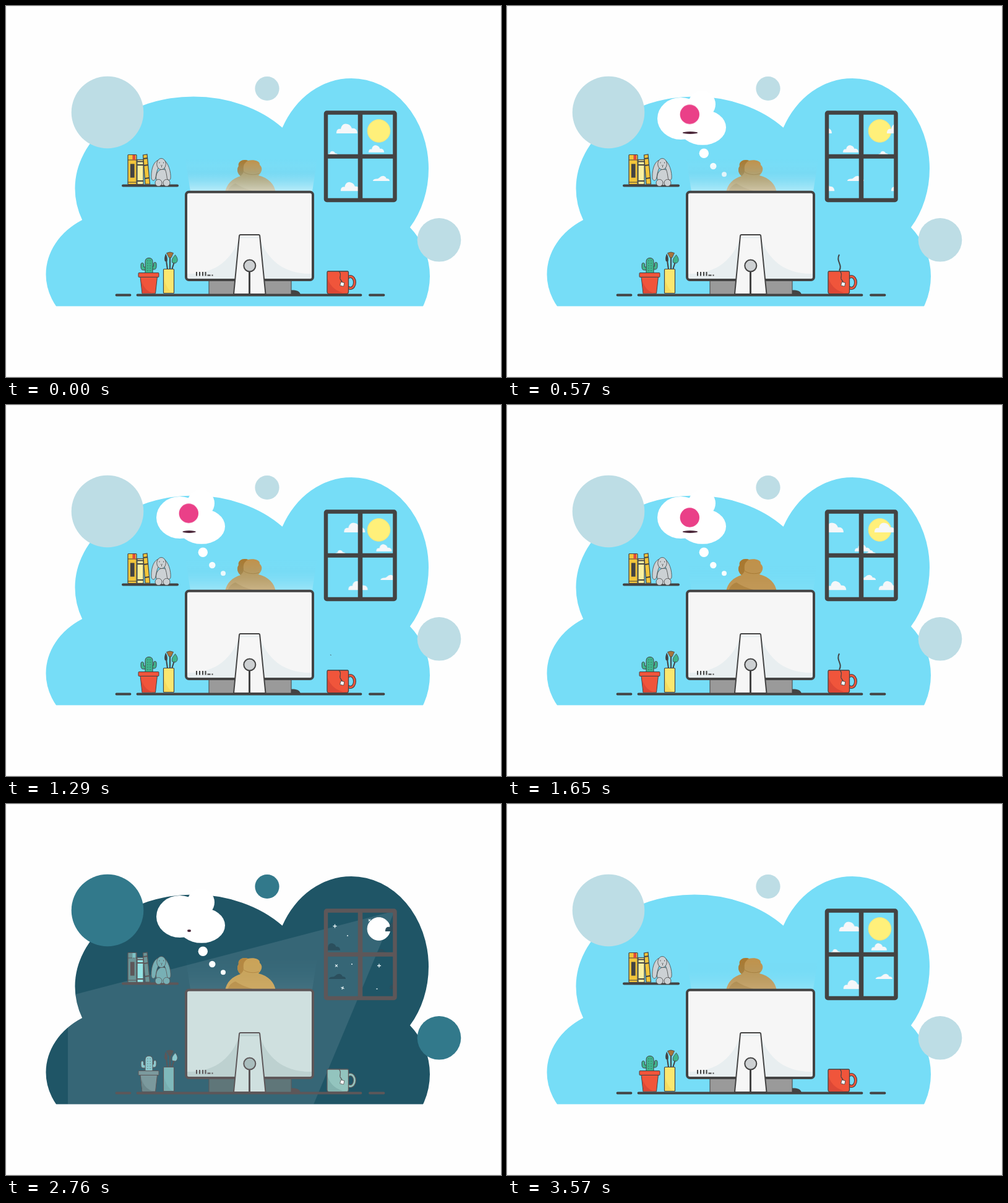
Write an HTML page that moves like this. It is 800 px wide and 600 px high and loops after 3600 ms.

```html
<!DOCTYPE html>
<html lang="en">
<head>
<meta charset="utf-8">
<title>Desk, day and night</title>
<style>
@property --n { syntax: '<percentage>'; inherits: true; initial-value: 0%; }
html, body { margin: 0; width: 100%; height: 100%; overflow: hidden; background: #fefefe; }
svg {
  display: block; width: 800px; height: 600px;
  animation: night 3600ms linear infinite;
  --sky: color-mix(in srgb, #1f5566 var(--n), #76ddf7);
  --orb: color-mix(in srgb, #32798b var(--n), #bddde5);
  --ink: color-mix(in srgb, #5d5759 var(--n), #434343);
  --mug: color-mix(in srgb, #93c4be var(--n), #f0553b);
  --mugDark: color-mix(in srgb, #82b2ae var(--n), #dd4836);
  --pot: color-mix(in srgb, #7b999d var(--n), #f0553b);
  --potDark: color-mix(in srgb, #6c878b var(--n), #dd4836);
  --pale: color-mix(in srgb, #cfe0df var(--n), #f6f6f6);
  --shade: color-mix(in srgb, #bdd1d0 var(--n), #e8eef0);
  --gray: color-mix(in srgb, #5f7679 var(--n), #9a9a9a);
  --knob: color-mix(in srgb, #a9bdbd var(--n), #cdd0d2);
  --green: color-mix(in srgb, #8cc9cf var(--n), #3fb58e);
  --gold: color-mix(in srgb, #6b9698 var(--n), #f2c53b);
  --butter: color-mix(in srgb, #7fb9bb var(--n), #fae76f);
  --cream: color-mix(in srgb, #94e3e4 var(--n), #f9f0a0);
  --mark: color-mix(in srgb, #7fc4c8 var(--n), #e0493a);
  --wood: color-mix(in srgb, #55595c var(--n), #a8743c);
  --fur: color-mix(in srgb, #78b0b5 var(--n), #ccd1d4);
  --hair: color-mix(in srgb, #cba358 var(--n), #c0914a);
  --hairDark: color-mix(in srgb, #b58740 var(--n), #a9782f);
  --sun: color-mix(in srgb, #ffffff var(--n), #fff07a);
  --rim: color-mix(in srgb, #ffffff var(--n), #e6e58c);
  --dusk: color-mix(in srgb, #2b4f5d var(--n), #f5f7f9);
}
@keyframes night { 0%, 47% { --n: 0%; } 55.5%, 90.8% { --n: 100%; } 98%, 100% { --n: 0%; } }
.late { opacity: var(--n); }
.ink { fill: none; stroke: var(--ink); }

.drift { fill: #f5f7f9; animation: 3600ms linear infinite; }
.dim { fill: var(--dusk); }
.a { animation-name: driftA; }
.b { animation-name: driftB; }
.c { animation-name: driftC; }
@keyframes driftA {
  0% { transform: translateX(534px); } 15.83% { transform: translateX(491px); }
  25% { transform: translateX(466px); } 33% { transform: translateX(420px); }
  33.01%, 55% { transform: translateX(690px); } 76.67% { transform: translateX(613px); }
  100% { transform: translateX(534px); }
}
@keyframes driftB {
  0% { transform: translateX(672px); } 15.83% { transform: translateX(614px); }
  25% { transform: translateX(586px); } 45.83% { transform: translateX(510px); }
  59.17% { transform: translateX(462px); } 75%, 100% { transform: translateX(400px); }
}
@keyframes driftC {
  0%, 25% { transform: translateX(690px); } 45.83% { transform: translateX(594px); }
  59.17% { transform: translateX(539px); } 76.67% { transform: translateX(463px); }
  100% { transform: translateX(400px); }
}

.pop, .ball, .shadow { transform-box: fill-box; transform-origin: center; }
.pop { fill: #fff; animation: pop 3600ms ease-out infinite backwards; }
@keyframes pop { 0%, 3% { transform: scale(0); } 6%, 81% { transform: scale(1); } 85%, 100% { transform: scale(0); } }

.bounce { animation: bounce 3600ms infinite; }
@keyframes bounce {
  0%, 12.5%, 25.83%, 39.17%, 52.5%, 65.83% {
    transform: translateY(0); animation-timing-function: cubic-bezier(.33, 0, .67, .33);
  }
  19.17%, 32.5%, 45.83%, 59.17%, 72.5%, 100% {
    transform: translateY(9px); animation-timing-function: cubic-bezier(.33, .67, .67, 1);
  }
}
.ball { fill: #ea4088; animation: ball 3600ms ease-out infinite; }
@keyframes ball { 0%, 12% { transform: scale(0); } 15%, 72.5% { transform: scale(1); } 75.5%, 100% { transform: scale(0); } }
.shadow { fill: #4a2638; animation: shadow 3600ms ease-in-out infinite; }
@keyframes shadow {
  0%, 12% { transform: scaleX(0); }
  15.83%, 19.17%, 32.5%, 45.83%, 59.17%, 72.5% { transform: scaleX(1); }
  25.83%, 39.17%, 52.5%, 65.83% { transform: scaleX(.75); }
  76.67% { transform: scaleX(.25); }
  77.8%, 100% { transform: scaleX(0); }
}

.steam { stroke-width: 2; stroke-dasharray: 1 2; animation: steam 3600ms linear infinite; }
.wisp { animation-name: wisp; }
@keyframes steam {
  0%, 7% { stroke-dashoffset: 1; } 15.83% { stroke-dashoffset: 0; } 23% { stroke-dashoffset: -1; }
  23.01%, 37% { stroke-dashoffset: 1; } 45.83% { stroke-dashoffset: 0; }
  53%, 100% { stroke-dashoffset: -1; }
}
@keyframes wisp {
  0%, 22% { stroke-dashoffset: 1; } 25% { stroke-dashoffset: .6; }
  29% { stroke-dashoffset: 0; } 36%, 100% { stroke-dashoffset: -1; }
}

.glow { animation: glow 3600ms linear infinite; }
@keyframes glow {
  0%, 25%, 100% { opacity: .85; } 15.83% { opacity: .7; } 45.83% { opacity: .1; }
  59.17% { opacity: .5; } 76.67% { opacity: .1; } 99% { opacity: .15; }
}
</style>
</head>
<body>
<svg viewBox="0 0 800 600">
  <defs>
    <clipPath id="floor"><rect width="800" height="485.5"/></clipPath>
    <clipPath id="room">
      <ellipse cx="303" cy="295" rx="191.5" ry="148.5"/>
      <ellipse cx="558" cy="263" rx="125" ry="146"/>
      <ellipse cx="190" cy="434" rx="125.5" ry="104"/>
      <ellipse cx="565" cy="437" rx="120" ry="116"/>
      <rect x="190" y="300" width="375" height="186"/>
    </clipPath>
    <clipPath id="panes">
      <rect x="520" y="175" width="49" height="65" rx="3"/>
      <rect x="576" y="175" width="49.500" height="65" rx="3"/>
      <rect x="520" y="246.500" width="49" height="64.500" rx="3"/>
      <rect x="576" y="246.500" width="49.500" height="64.500" rx="3"/>
    </clipPath>
    <linearGradient id="light" x1="0" y1="0" x2="0" y2="1">
      <stop offset="0" stop-color="#9fe4f7" stop-opacity="0"/>
      <stop offset=".4" stop-color="#7fd0ea" stop-opacity=".3"/>
      <stop offset="1" stop-color="#e4f7fc" stop-opacity=".75"/>
    </linearGradient>
    <path id="puff" d="M0 16C0 10 3 8 7 9C8 2 13-1 18 1C22 2 24 5 25 8C30 7 34 10 34 16Z"/>
    <path id="flat" d="M0 9Q0 6 5 5.500Q8 6 10 4Q14 0 18 1Q21 2 22 5Q27 5 27 9Z"/>
    <g id="sky">
      <use href="#puff" y="190"/>
      <use href="#puff" transform="translate(52 225) scale(.74)"/>
      <use href="#puff" transform="translate(-14 234.500) scale(.48)"/>
      <use href="#flat" x="59" y="274"/>
      <use href="#puff" transform="translate(7 284.500) scale(.92)"/>
    </g>
    <path id="plus" d="M-3 0H3M0-3V3"/>
  </defs>

  <rect x=".5" y=".5" width="799" height="599" fill="none" stroke="#f3f3f3"/>

  <g clip-path="url(#floor)">
    <rect width="800" height="600" fill="var(--sky)" clip-path="url(#room)"/>
    <path class="late" d="M628 173L100 311V486H497Z" fill="#fff" fill-opacity=".1" clip-path="url(#room)"/>
  </g>
  <g fill="var(--orb)">
    <circle cx="164" cy="172" r="58.300"/>
    <circle cx="422" cy="133.500" r="19.600"/>
    <circle cx="700" cy="378.300" r="35.300"/>
  </g>

  <!-- window -->
  <g clip-path="url(#panes)">
    <g class="late" fill="none" stroke="#e6f4f6" stroke-width="1.300">
      <use href="#plus" x="531.500" y="197.500"/>
      <use href="#plus" x="603" y="261.500"/>
      <use href="#plus" transform="translate(534 261.500) rotate(45) scale(.9)"/>
      <use href="#plus" transform="translate(544 297.500) rotate(25) scale(.9)"/>
      <use href="#plus" transform="translate(587.500 188) rotate(45) scale(.8)"/>
      <path d="M551 213h2M558 259h2M598.500 299h2"/>
    </g>
    <circle cx="602.500" cy="202" r="18.400" fill="var(--sun)" stroke="var(--rim)"/>
    <use href="#sky" class="drift dim a"/>
    <use href="#sky" class="drift b"/>
    <use href="#sky" class="drift dim c"/>
  </g>
  <g class="ink">
    <rect x="517" y="172.500" width="111.500" height="141.500" rx="1.500" stroke-width="6.500"/>
    <path d="M572.500 173V314" stroke-width="7.500"/>
    <path d="M517 243.300H628" stroke-width="7"/>
  </g>

  <!-- shelf -->
  <path class="ink" d="M189 290.500H277" stroke-width="4" stroke-linecap="round"/>
  <g stroke="var(--ink)" stroke-width="1.200">
    <rect x="197" y="240.500" width="14" height="48" rx="1" fill="var(--gold)"/>
    <path d="M197 249H211M197 285H211" fill="none"/>
    <rect x="201.500" y="256" width="5.500" height="21" fill="var(--ink)"/>
    <path d="M204.500 241h4.500v9l-2.200-2l-2.300 2z" fill="var(--mark)" stroke="none"/>
    <rect x="212" y="248.500" width="10" height="40" fill="var(--cream)"/>
    <path d="M212 251.500h10M212 257h10M212 283h10" stroke-width="2"/>
    <path d="M221.500 241L228 240L232.500 288H225Z" fill="var(--gold)"/>
    <path d="M222 247l6.500-1M223 258l6.500-1M224.500 279l6.500-1" stroke-width="2"/>
  </g>
  <g fill="var(--fur)" stroke="var(--ink)" stroke-width=".8">
    <ellipse cx="253" cy="277" rx="10.500" ry="13"/>
    <path d="M247 249C238 251 234 266 235 279C237 284 241 283 242 277C243 269 245 263 249 257Z"/>
    <path d="M255 249C262 253 267 268 266 279C264 284 260 281 260 276C259 268 257 262 253 257Z"/>
    <ellipse cx="251" cy="255.500" rx="7.300" ry="9"/>
    <circle cx="246.500" cy="286" r="5.500"/>
    <circle cx="259.500" cy="286" r="5.500"/>
    <path d="M250 257l1.500 1.500l1.500-1.500M251.500 259v2" fill="none"/>
    <path d="M247.500 253.500h1M254 253.500h1" stroke-width="1.600"/>
  </g>

  <!-- thought -->
  <circle class="pop" cx="351" cy="272.300" r="4"/>
  <circle class="pop" cx="333.300" cy="259" r="5.200" style="animation-delay:80ms"/>
  <circle class="pop" cx="318.300" cy="238.300" r="7.700" style="animation-delay:160ms"/>
  <g class="pop" style="animation-delay:240ms">
    <ellipse cx="281" cy="182" rx="38" ry="34"/>
    <ellipse cx="316" cy="196.300" rx="38" ry="28.500"/>
    <circle cx="315" cy="159" r="22"/>
  </g>
  <ellipse class="shadow" cx="296" cy="205" rx="12.300" ry="1.900"/>
  <g class="bounce"><circle class="ball" cx="295.300" cy="173" r="15.700"/></g>

  <!-- head and screen light -->
  <path d="M354 302C356 288 366 279 379 275C373 270 373 263 376 259C374 252 383 247 391 250C400 248 411 250 410 257C416 262 413 270 408 274C424 278 434 288 436 302Z" fill="var(--hair)"/>
  <path d="M376 259C374 252 383 247 391 250C385 254 383 258 384 266C384 270 382 272 379 275C373 270 373 263 376 259Z" fill="var(--hairDark)"/>
  <path d="M358 300C361 292 365 289 371 287C378 292 388 296 402 300Z" fill="var(--hairDark)" opacity=".75"/>
  <path d="M384 268C389 273 402 274 409 271" fill="none" stroke="var(--hairDark)"/>
  <path class="glow" d="M290 248H503L495 300H298Z" fill="url(#light)"/>

  <!-- desk -->
  <path class="ink" d="M178.500 467.500H200.500M212.500 467.500H573.500M588 467.500H610.500" stroke-width="3.800" stroke-linecap="round"/>
  <path d="M452 467C453 461 459 459 465 459.500C471 460 475 462 476 467Z" fill="var(--ink)"/>

  <!-- computer -->
  <rect x="328" y="444" width="133" height="22" fill="var(--gray)" stroke="var(--ink)"/>
  <rect x="291" y="300.800" width="205" height="142.200" rx="4.500" fill="var(--pale)"/>
  <path d="M293 433C340 434 366 408 377 375H410C421 408 447 434 494 433V441H293Z" fill="var(--shade)"/>
  <rect class="ink" x="291" y="300.800" width="205" height="142.200" rx="4.500" stroke-width="4"/>
  <path d="M308 430v6.500M313 430v6.500M318 430v6.500M322.500 430v6.500" class="ink" stroke-width="2"/>
  <path d="M325.500 435.500h5M332.500 435.500h2" class="ink" stroke-width="1.800"/>
  <path d="M379 370H408.500Q410 370 410.200 372L419.500 466H368L377 372Q377.200 370 379 370Z" fill="var(--pale)" stroke="var(--ink)" stroke-width="2"/>
  <path d="M379 374H408.500" stroke="var(--shade)" stroke-width="3"/>
  <path class="ink" d="M393.500 429V466" stroke-width="3"/>
  <circle cx="393.800" cy="420" r="9.500" fill="var(--knob)" stroke="var(--ink)" stroke-width="2"/>

  <!-- cactus -->
  <g stroke="var(--ink)">
    <path d="M227 427H222Q218 427 218 422V418Q218 415.500 220.300 415.500Q222.500 415.500 222.500 418V422H227Z" fill="var(--green)"/>
    <path d="M235 426H239Q243 426 243 421V417Q243 414.500 240.700 414.500Q238.500 414.500 238.500 417V421H235Z" fill="var(--green)"/>
    <path d="M225 432V413.500Q225 407.500 231 407.500Q237 407.500 237 413.500V432Z" fill="var(--green)"/>
    <path d="M229 411V430M233 411V430" fill="none" stroke-dasharray="2 2" opacity=".6"/>
    <path d="M217 438H244.500L241.500 465H220Z" fill="var(--pot)"/>
    <path d="M218 440C220 453 227 461 237 464.500H220.500Z" fill="var(--potDark)" stroke="none"/>
    <rect x="214" y="431.500" width="33" height="7" rx="1" fill="var(--pot)"/>
  </g>

  <!-- brushes -->
  <path class="ink" d="M261 426L258.500 408M265 426V406M268 426L272 414" stroke-width="2"/>
  <path d="M257 413C255 408 257 404 258 400.500C260 404 261.500 408 260.500 413Z" fill="var(--ink)"/>
  <path d="M259.500 399.500Q265 396.500 270.500 399.500L267 407H263.500Z" fill="var(--wood)" stroke="var(--ink)" stroke-width=".8"/>
  <path d="M268.500 415C267 409 271 406 273.500 402.500C278 408 278.500 413 274 416Z" fill="var(--green)" stroke="var(--ink)" stroke-width=".8"/>
  <rect x="254.500" y="425.500" width="17" height="39" rx="1" fill="var(--butter)" stroke="var(--ink)" stroke-width="1.200"/>
  <path d="M255.500 442C258 452 263 460 269 464H255.500Z" fill="var(--gold)" opacity=".3"/>

  <!-- mug -->
  <ellipse cx="556.500" cy="447" rx="7" ry="9.500" class="ink" stroke-width="5"/>
  <ellipse cx="556.500" cy="447" rx="7" ry="9.500" fill="none" stroke="var(--mug)" stroke-width="2.800"/>
  <path d="M520.500 429H552Q553.500 429 553.500 431V462Q553.500 465.500 550 465.500H522.500Q519 465.500 519 462V431Q519 429 520.500 429Z" fill="var(--mug)" stroke="var(--ink)" stroke-width="1.300"/>
  <path d="M520 441C524 454 534 462 549 465H522.500Q520 464.500 520 462Z" fill="var(--mugDark)"/>
  <path class="ink" d="M538 429C544 434 537 439 541 443C542.500 444.500 543 445 543 447" stroke-width="1.200"/>
  <rect x="540.300" y="446.800" width="6" height="6" fill="#fff" stroke="var(--ink)" stroke-width=".8" transform="rotate(12 543 450)"/>
  <path class="ink steam" pathLength="1" d="M537 428C543 418 531 413 537 402"/>
  <path class="ink steam wisp" pathLength="1" d="M529.500 429C529 423 522 426 525 419C528 413 522 410 525 404"/>
</svg>
</body>
</html>
```
